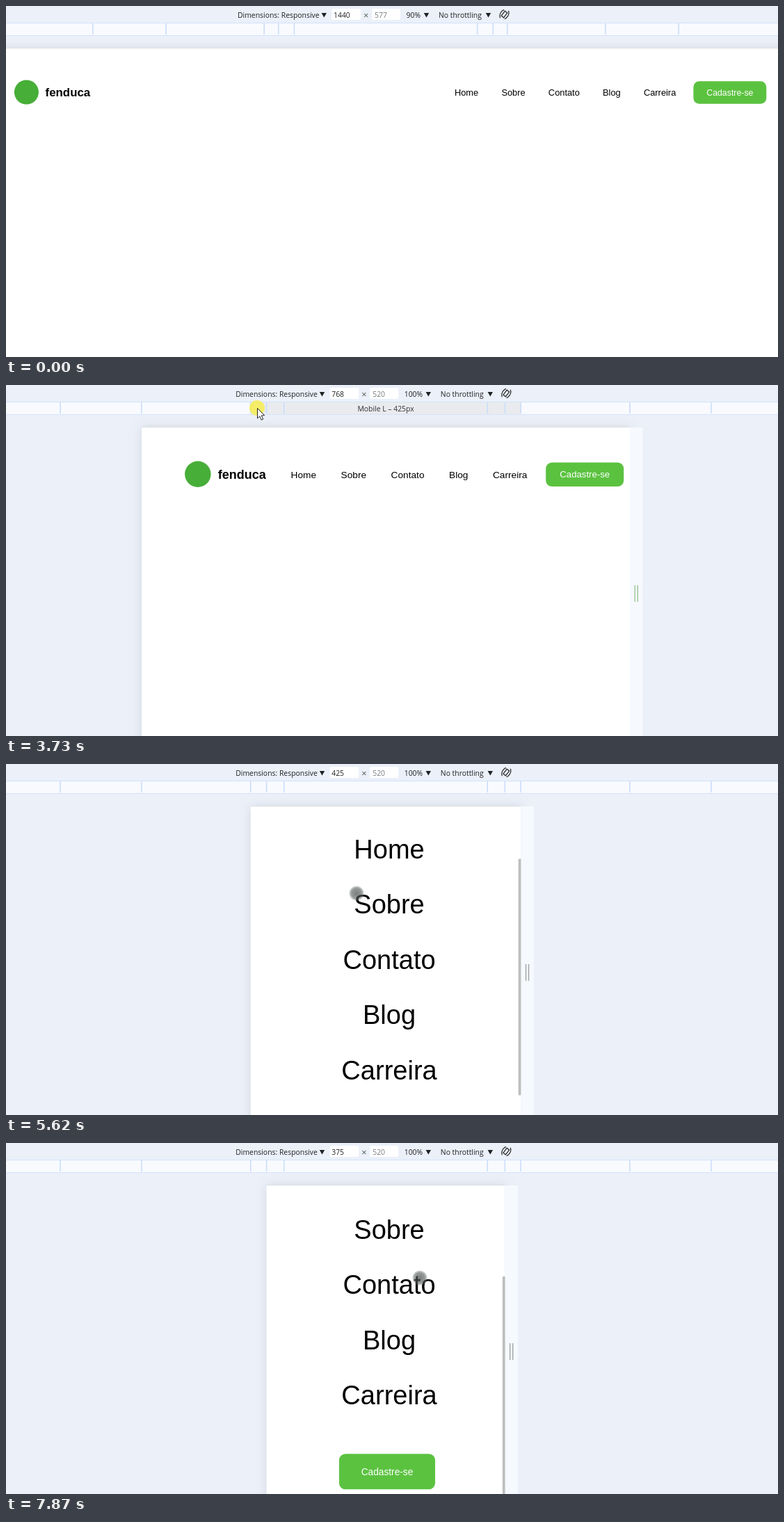
Write an HTML page with a canvas that moves like this. It is 1110 by 505 pixels and loops after 8 s.

```html
<!DOCTYPE html>
<html lang="pt-BR">
<head>
<meta charset="utf-8">
<title>Responsive page preview</title>
<style>
html, body { margin: 0; width: 1110px; height: 505px; overflow: hidden; background: #ebf0f9; }
canvas { display: block; }
</style>
</head>
<body>
<canvas id="stage" width="1110" height="505"></canvas>
<script>
const ctx = document.getElementById('stage').getContext('2d');
const LOOP = 8000;
const SANS = '"Liberation Sans", Arial, sans-serif';
const UI = '10.4px "Open Sans", "Noto Sans", sans-serif';
const INK = '#202124', GREEN = '#5bc240', DESK = '#ebf0f9';
const BRAND = 'fenduca';
const LINKS = ['Home', 'Sobre', 'Contato', 'Blog', 'Carreira'];

// Stage pixels per device pixel, page centre and top, scroll range in stage pixels
const PX = .914, MID = 546, TOP = 61, VIEW = 475, SCROLL = 183;
const RULER = [1024, 768, 425, 375, 320];

// Each ruler segment is hovered between from and to, and opened by a click
const visits = [
  { width: 1024, name: 'Laptop', from: 1070, open: 1620, to: 1620 },
  { width: 768, name: 'Tablet', from: 1620, open: 2830, to: 3400 },
  { width: 425, name: 'Mobile L', from: 3400, open: 3870, to: 4190 },
  { width: 375, name: 'Mobile M', from: 6440, open: 6870, to: 7120 }
];

// Pointer moves: start, end, x, y
const moves = [
  [240, 1000, 239, 44], [1000, 1140, 217, 31], [1750, 2090, 283, 31], [3050, 3520, 361, 33],
  [4120, 4740, 504, 186], [5830, 6340, 396, 34], [7080, 7500, 595, 194]
];

const ramp = (t, a, b) => Math.min(1, Math.max(0, (t - a) / (b - a)));
const smooth = k => k * k * (3 - 2 * k);
const easeOut = k => Math.sin(k * Math.PI / 2);

function pointer(t) {
  let x = 992, y = 458;
  for (const [start, end, toX, toY] of moves) {
    const k = smooth(ramp(t, start, end));
    x += (toX - x) * k;
    y += (toY - y) * k;
  }
  return [x, y];
}

function scrollAt(t) {
  const s = Math.floor((t - 40) / 70) * 70 + 40;
  const run = (a, b) => easeOut(ramp(s, a, b));
  return SCROLL * (run(4800, 5220) - run(5450, 5880) + run(7480, 7820));
}

const thumbAlpha = t => ramp(t, 4790, 4800) - ramp(t, 6270, 6510) + ramp(t, 7480, 7500);

function rect(x, y, w, h, fill, r = 0) {
  ctx.fillStyle = fill;
  ctx.beginPath();
  ctx.roundRect(x, y, w, h, r);
  ctx.fill();
}

function disc(x, y, r, fill) {
  ctx.fillStyle = fill;
  ctx.beginPath();
  ctx.arc(x, y, r, 0, 7);
  ctx.fill();
}

function text(str, x, y, font, fill = '#000', align = 'left') {
  ctx.font = font;
  ctx.fillStyle = fill;
  ctx.textAlign = align;
  ctx.fillText(str, x, y);
}

function poly(points, fill) {
  ctx.beginPath();
  points.forEach(([x, y]) => ctx.lineTo(x, y));
  ctx.closePath();
  ctx.fillStyle = fill;
  ctx.fill();
}

function button(x, y, w, h) {
  rect(x, y, w, h, GREEN, 10);
  text('Cadastre-se', x + w / 2, y + h / 2 + 5.2, `15px ${SANS}`, '#fff', 'center');
}

function brand(x, y, size, base) {
  disc(x, y, 21.3, '#47ae38');
  text(BRAND, x + 33, base, `bold ${size}px ${SANS}`);
}

// Page content uses device pixels, with x = 0 at the page centre
function wideContent(width) {
  const compact = width < 1000;
  const unit = compact ? .961 : 1;
  const half = width / 2 / unit;
  ctx.scale(unit, unit);
  brand(92 - half, 76.6, 20.5, 84.2);
  const left = half - (compact ? 10 : 54.7) - 127.5;
  button(left, 57.4, 127.5, 39.4);
  let x = left - 417.5;
  for (const link of LINKS) {
    text(link, x, 82.6, `15.6px ${SANS}`);
    x += ctx.measureText(link).width + 40.4;
  }
}

function narrowContent() {
  brand(-79.9, 82, 41.1, 99);
  LINKS.forEach((link, i) => text(link, 5.5, 197 + 87 * i, `41.6px ${SANS}`, '#000', 'center'));
  button(-73.3, 622.5, 151, 56);
}

function drawPage(width, zoom, t) {
  const scale = PX * zoom, w = width * scale;
  const left = MID - w / 2, right = MID + w / 2;
  const phone = width < 500;
  const scroll = phone ? scrollAt(t) : 0;

  ctx.save();
  ctx.shadowColor = 'rgba(0,0,0,.1)';
  ctx.shadowBlur = 14;
  rect(left, TOP, w, VIEW, '#fff');
  ctx.restore();
  rect(left, TOP - .5, w, .7, '#dcdfe4');
  rect(right, TOP, 18.5, VIEW, '#f6f9fe');
  for (const dx of [6.6, 10.6]) rect(right + dx, 288, 1.4, 24, width === 768 ? '#9cc79a' : '#a0a3a4');

  ctx.save();
  ctx.beginPath();
  ctx.rect(left, TOP, w, VIEW);
  ctx.clip();
  ctx.translate(MID, TOP - scroll);
  ctx.scale(scale, scale);
  if (phone) narrowContent();
  else wideContent(width);
  ctx.restore();

  if (phone) {
    ctx.globalAlpha = thumbAlpha(t);
    rect(right - 3.5, TOP + scroll * .716, 3.7, 340, '#bdbfbc');
    ctx.globalAlpha = 1;
  }
  return { left, right };
}

function rotateIcon(x) {
  ctx.save();
  ctx.translate(x, 12);
  ctx.rotate(.65);
  ctx.strokeStyle = '#333';
  ctx.lineWidth = 1.3;
  ctx.strokeRect(-2.2, -4.3, 4.4, 8.6);
  for (let i = 0; i < 2; i++) {
    ctx.rotate(Math.PI);
    ctx.beginPath();
    ctx.ellipse(0, 0, 5.6, 8, 0, -1.3, .7);
    ctx.stroke();
  }
  ctx.restore();
}

function drawBar(width, zoom) {
  // The centred row grows to both sides with the longer zoom label
  const grow = zoom < 1 ? 0 : 2.8;
  const left = 333 - grow, right = 622 + grow;
  const caret = x => poly([[x - 3.7, 10], [x + 3.7, 10], [x, 16.5]], INK);
  rect(0, 0, 1110, 24, DESK);
  text('Dimensions: Responsive', left, 16.5, UI, INK);
  rect(left + 135.5, 4, 41.5, 16, '#fff', 2);
  rect(left + 193, 4, 41, 16, '#fff', 2);
  text(width, left + 138, 16.5, UI, INK);
  text('×', left + 184.7, 17.8, UI.replace('10.4', '13'), '#4f5f55', 'center');
  text(zoom < 1 ? '577' : '520', left + 197, 16.5, UI, '#777a7e');
  text(zoom * 100 + '%', left + 242.5, 16.5, UI, INK);
  text('No throttling', right, 16.5, UI, INK);
  [left + 124.3, right - 17.5, right + 71.5].forEach(caret);
  rotateIcon(right + 94.5);
}

function drawRuler(zoom, hover) {
  const reach = width => width * PX * zoom / 2;
  rect(0, 24, 1110, 19, '#d5e3fa');
  rect(0, 25, 1110, 17, '#f8fafe');
  if (hover) {
    const r = reach(hover.width);
    rect(MID - r, 25, 2 * r, 17, '#e9ebee');
    text(`${hover.name} – ${hover.width}px`, MID, 37.5, UI, '#303134', 'center');
  }
  for (const width of RULER)
    for (const side of [-1, 1]) rect(MID + side * reach(width) - .8, 25, 1.6, 16, '#cbddfa');
}

function drawPointer([x, y], page, pressed) {
  if (pressed) disc(x, y, 11, 'rgba(248,238,70,.8)');
  if (y > TOP && x > page.left && x < page.right) {
    const g = ctx.createRadialGradient(x, y, 0, x, y, 10.5);
    g.addColorStop(0, 'rgba(70,76,74,.72)');
    g.addColorStop(.7, 'rgba(85,92,88,.62)');
    g.addColorStop(1, 'rgba(130,140,130,.35)');
    disc(x, y, 10.5, g);
    return;
  }
  ctx.save();
  ctx.translate(x + .5, y + .5);
  poly([[0, 0], [0, 14.5], [3.3, 11.4], [5.7, 16.8], [8.2, 15.7], [5.8, 10.5], [10.2, 10.2]], '#fff');
  ctx.strokeStyle = '#222';
  ctx.lineWidth = 1;
  ctx.stroke();
  ctx.restore();
}

function draw(t) {
  const width = visits.reduce((w, v) => t >= v.open ? v.width : w, 1440);
  const zoom = width > 1024 ? .9 : 1;
  const hover = visits.find(v => t >= v.from && t < v.to);
  const pressed = visits.some(v => t >= v.open - 210 && t < v.open - 70);
  rect(0, 0, 1110, 505, DESK);
  const page = drawPage(width, zoom, t);
  drawBar(width, zoom);
  drawRuler(zoom, hover);
  if (t >= 240) drawPointer(pointer(t), page, pressed);
}

const begin = performance.now();
function tick() {
  draw((performance.now() - begin) % LOOP);
  requestAnimationFrame(tick);
}
tick();
</script>
</body>
</html>
```
